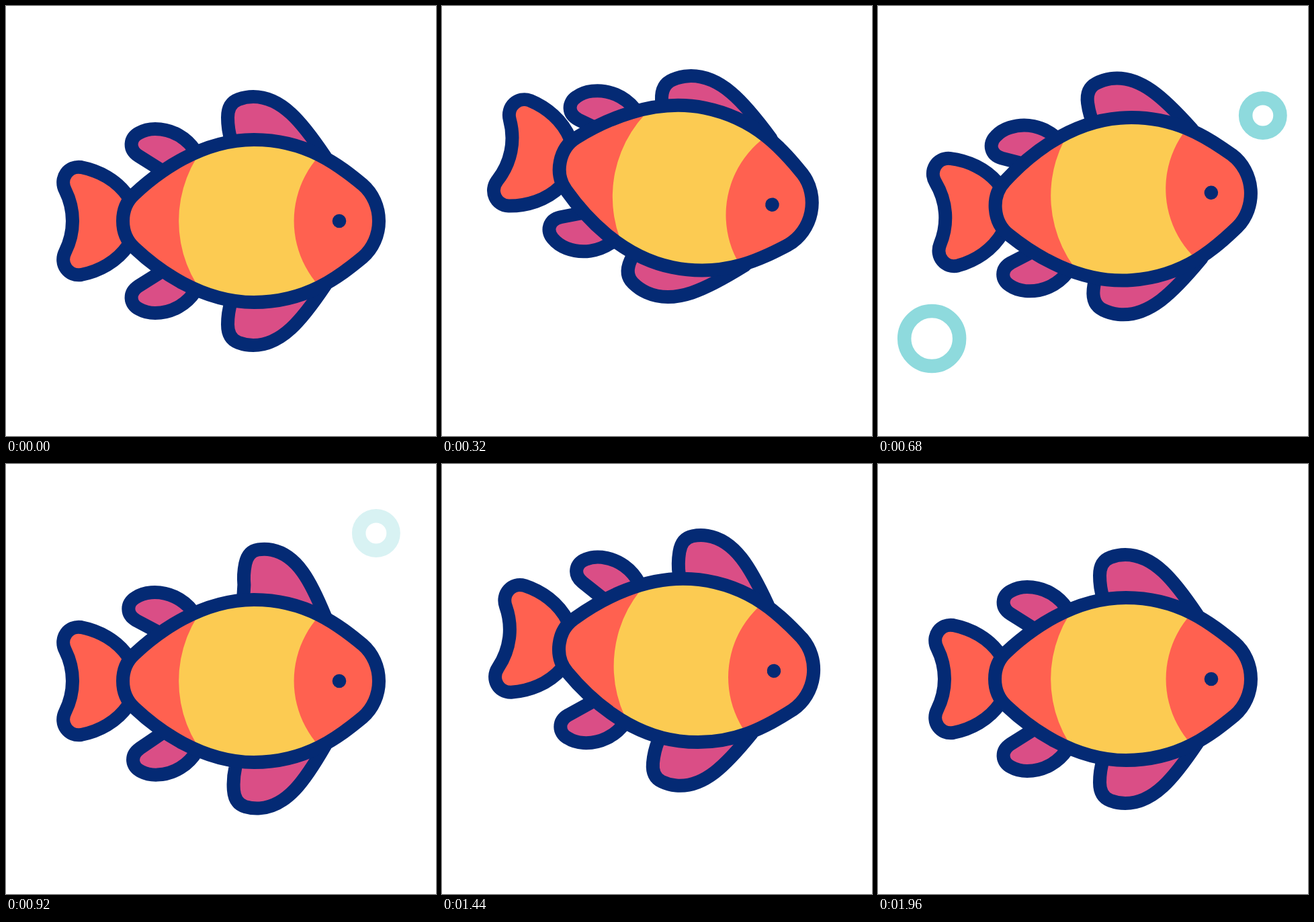
Write an HTML page that moves like this. It is 640x640 px and loops after 2 s.

```html
<!DOCTYPE html>
<html lang="en">
<head>
<meta charset="utf-8">
<title>Swimming fish</title>
<style>
  html, body { margin: 0; width: 100%; height: 100%; overflow: hidden; background: #fff; }
  svg { display: block; width: 100%; height: 100%; }
  #fish { stroke: #042a74; stroke-width: 20; stroke-linecap: round; stroke-linejoin: round; }
  .fins { fill: #da4e86; }
  .red { fill: #ff6150; }
  .bubble { fill: none; stroke: #8edadd; stroke-width: 20.5; }
</style>
</head>
<body>
<svg viewBox="0 0 640 640">
  <defs>
    <path id="body" d="M174 320C174 304 180 290 191 280C225 248 290 199 369 199S497 238 531 266C546 279 555 299 555 320S546 361 531 374C497 402 448 441 369 441S225 392 191 360C180 350 174 336 174 320Z"/>
    <path id="frontFin" d="M340 235L335 200C332 190 330 180 330 166C330 152 335 143 346 139C354 136 361 135 368 135C410 135 440 172 475 224"/>
    <path id="backFin" d="M250 256L232 245L197 223C182 213 184 196 198 189C205 185 214 183 222 183C247 183 269 196 282 216L290 232"/>
    <clipPath id="inside"><use href="#body"/></clipPath>
  </defs>
  <circle class="bubble" r="41"/>
  <circle class="bubble" r="25.7"/>
  <g id="fish">
    <path class="red" d="M182 284C165 259 138 245 112 240C93 237 79 256 88 274C95 288 99 304 99 320S95 352 88 366C79 384 93 403 112 400C138 395 165 381 182 356"/>
    <g class="fins">
      <use href="#backFin"/>
      <use href="#frontFin"/>
      <g transform="matrix(1 0 0 -1 0 640)">
        <use href="#backFin"/>
        <use href="#frontFin"/>
      </g>
    </g>
    <use href="#body" class="red" stroke="none"/>
    <path d="M303 200A180 180 0 0 0 303 440H493A144 144 0 0 1 493 200Z" fill="#fccb52" stroke="none" clip-path="url(#inside)"/>
    <use href="#body" fill="none"/>
    <circle cx="496" cy="320" r="10.3" fill="#042a74" stroke="none"/>
  </g>
</svg>
<script>
const LOOP = 2000, STEP = 40;
const fish = document.getElementById('fish');
const [backTop, frontTop, backLow, frontLow] = document.querySelectorAll('.fins use');
const [leftBubble, rightBubble] = document.querySelectorAll('.bubble');

const clamp = v => Math.max(0, Math.min(1, v));
const ease = (t, from, to) => (1 - Math.cos(Math.PI * clamp((t - from) / (to - from)))) / 2;
const hump = (t, start, peak, end) => ease(t, start, peak) - ease(t, peak, end);

function lift(t) {
  return 3 * hump(t, 740, 920, 1080) - 70 * hump(t, 0, 430, 880) - 37 * hump(t, 1060, 1360, 1780);
}

// Nose dips, holds, swings up past level and settles.
function nod(t, start, length, dip) {
  const u = (t - start) / length, up = 5.2;
  return dip * ease(u, 0, 0.2) - (dip + up) * ease(u, 0.39, 0.8) + up * ease(u, 0.8, 1);
}

// A fin folds back, spreads, then returns to rest.
function poseFin(node, t, fold, foldAt, spread, spreadAt, [x, y], stretch = 0) {
  const angle = (spread - fold) * ease(t, foldAt, spreadAt)
    + fold * ease(t, 0, foldAt) - spread * ease(t, spreadAt, 1620);
  const scale = 1 - stretch * angle;
  node.setAttribute('transform',
    `translate(${x} ${y}) rotate(${angle}) scale(${scale}) translate(${-x} ${-y})`);
  node.setAttribute('stroke-width', 20 / scale);
}

// A bubble rises while swaying out to one side and back.
function poseBubble(node, t, start, x, y, side) {
  const u = (t - start) / 440;
  const shown = u >= 0 && u < 1;
  node.setAttribute('opacity', shown ? Math.min(clamp(0.3 + u * 5), clamp((1 - u) * 3.8)) : 0);
  node.setAttribute('cx', x + side * 35 * (1 - Math.sin(Math.PI * clamp(u))));
  node.setAttribute('cy', y - 110 * u);
}

function draw(t) {
  const tilt = nod(t, 0, 920, 11.5) + nod(t, 1060, 780, 9);
  fish.setAttribute('transform', `translate(0 ${lift(t)}) rotate(${tilt} 320 315)`);

  const front = [475, 225], back = [290, 267];
  poseFin(frontTop, t, -16.5, 430, 12, 960, front, 0.0075);
  poseFin(frontLow, t, -16.5, 470, 8, 1080, front, 0.0075);
  poseFin(backTop, t, -21, 430, -4, 960, back);
  poseFin(backLow, t, -13, 490, 10, 1200, back);

  poseBubble(leftBubble, t, 400, 77, 565, 1);
  poseBubble(rightBubble, t, 520, 576, 203, -1);
}

const begin = performance.now();
function tick() {
  const t = (performance.now() - begin) % LOOP;
  draw(Math.floor(t / STEP) * STEP);
  requestAnimationFrame(tick);
}
tick();
</script>
</body>
</html>
```
